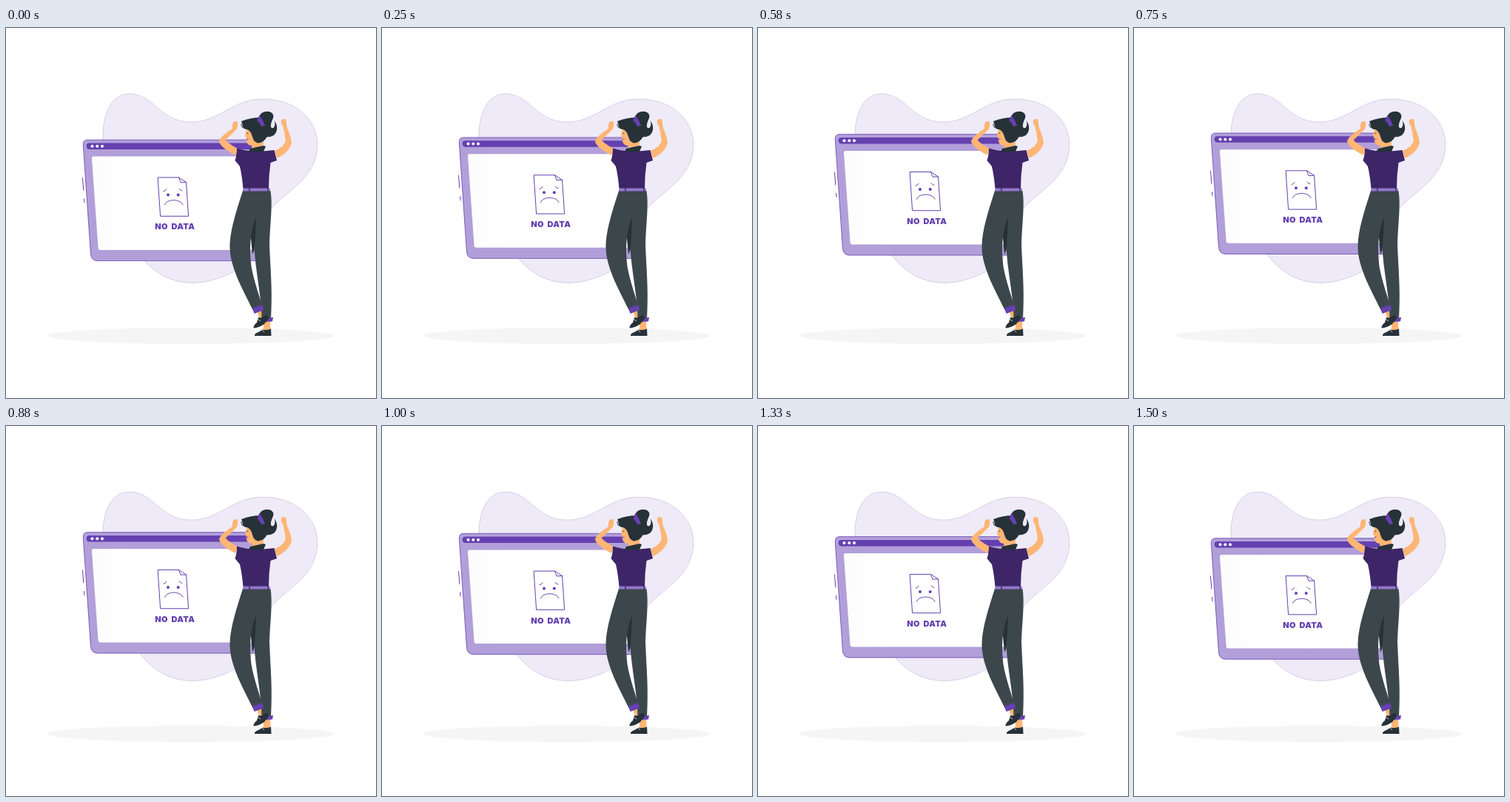
These frames come from a looping animation (500x500 px, 1.54 s). An HTML page:

```html
<!DOCTYPE html>
<html lang="en">
<head>
<meta charset="utf-8">
<title>No data</title>
<style>
  html, body { margin: 0; width: 100%; height: 100%; overflow: hidden; background: #fff; }
  svg { display: block; width: 100%; height: 100%; }
  .main { fill: #6540b0; }
  .dark { fill: #263238; }
  .skin { fill: #ffb573; }
  .pants { fill: #3c474c; }
  .line { fill: none; stroke: #6540b0; stroke-linecap: round; stroke-linejoin: round; }
  text { font: 900 11px Inter, sans-serif; letter-spacing: .35px; word-spacing: 2px; }
</style>
</head>
<body>
<svg viewBox="0 0 500 500">
  <defs>
    <linearGradient id="screen">
      <stop offset="0" stop-color="#fcfcfc"/>
      <stop offset=".3" stop-color="#fff"/>
    </linearGradient>
  </defs>

  <path fill="#eeeaf7" stroke="#a99bc9" stroke-width=".4" d="M131 150C130 115 143 89 166 89C200 88 207 127 250 127C290 127 305 95 350 96C395 97 421 127 421 158C420 200 385 217 362 240C345 258 345 304 320 322C302 334 276 344.5 252 344.5C220 344 197 329 180 306C160 280 131 200 131 150Z"/>
  <ellipse cx="249.5" cy="416" rx="193.5" ry="11" fill="#f5f5f5"/>

  <g id="window">
    <path fill="#b29fd9" stroke="#6540b0" stroke-width=".8" d="M110 151.2H331Q336 151.2 336.4 157L346 314.6H124Q115.5 314.6 114.5 306L104.300 158Q104 151.2 110 151.2Z"/>
    <path class="main" d="M112.5 155.5H332V164H113Q109 164 108.700 159.7Q108.5 155.5 112.5 155.5Z"/>
    <g fill="#fff">
      <circle cx="116.5" cy="159.7" r="2"/>
      <circle cx="123.3" cy="159.7" r="2"/>
      <circle cx="130" cy="159.7" r="2"/>
    </g>
    <path fill="url(#screen)" d="M118.5 173.5H327L334 300H127.5Q124.9 300 124.6 297.5L116 176.5Q115.8 173.5 118.5 173.5Z"/>
    <path class="line" d="M205.5 202H233.5L243.5 208.5L246.6 254.3H209ZM233.5 202L236 208.8L243.5 208.5"/>
    <path class="line" d="M213 220.8Q216 220 217 217.8M234 217.3Q235.5 219.5 238 220M214.5 238.8C217 230.5 236 230.5 239 238.8"/>
    <circle class="main" cx="219" cy="225.5" r="2"/>
    <circle class="main" cx="232.7" cy="225.5" r="2"/>
    <path class="line" d="M103.5 202.5L104.8 219.5M105.6 231L106 236"/>
    <text class="main" x="201.3" y="272.5">NO DATA</text>
  </g>

  <g id="woman">
    <path class="skin" d="M339 383L346 380L349 391L343 394ZM348 396H357L357.5 409H348Z"/>
    <path class="skin" d="M307.5 127Q310 125 313 127.5Q314 132 311.5 137L297 151Q297 154 313 163L310 172Q289 161 288 153Q289 147 306 136Q305.5 130 307.5 127ZM372 124Q377 121.5 378.5 125L379.5 134Q386 149 386 155Q383 168 366 176L363 166Q376 161 378 152L374.5 133Q371.5 130 372 124Z"/>
    <path class="pants" d="M329 220H357.5C360.5 238 357 265 356 290C357 325 360.5 350 358 394L345.5 393C346 365 336 325 335 287Z"/>
    <path class="dark" d="M329 262L338 256Q337 285 335.5 300L333 306Z"/>
    <path class="pants" d="M320 220H349L338 255C329 278 329 300 331.5 322C335 342 342 360 346.5 377L334 382C322 357 303 325 302.5 297C302 275 312 245 320 220Z"/>
    <path class="main" d="M333 378.5L346 374L348.5 381L335.5 386ZM346 393L361 391L360 396.5L346 397.5Z"/>
    <path class="dark" d="M341 391Q346 393 352 387L355.5 392L349 400Q342 405 334.5 405.5Q334 402 339 398ZM347 407.5Q352 409 358 406.5L358.5 416H336Q335.5 412.5 341 411Z"/>
    <path d="M339 393L344 396M345 407L349 411" stroke="#fff" stroke-width=".7"/>
    <path fill="#3d2567" d="M312 162.5Q330 168 347 166.5L362.5 165L366 179L357.5 182Q355 199 355 217H320.5Q319 200 316 187L309.5 179Q312 172 312 162.5Z"/>
    <path fill="#9177c9" d="M320.5 216.5H356.5L357 220.5H320Z"/>
    <path d="M329 216V221M354 216V221" stroke="#3d2567" stroke-width="1.3"/>

    <path class="skin" d="M325 136L323 146L324.5 148Q324.5 160 333 159L332 165H347L349 145L339 135Z"/>
    <path class="dark" d="M330 163Q338 161 348 159L351 160L348 167H328ZM318 126Q331 121 343 121Q355 127 355 140Q352 154 341 155.5Q335 155 333 147Q331 139 326 137Q321 137 319.5 133Q320 130 318 126Z"/>
    <path class="dark" d="M342 121C343 111.5 358 110 361 117C363 122 357 126 358 134C362 138 365 131 362.5 125C370 134 366 149 352 147L347 132Z"/>
    <path class="main" d="M343 118Q339 121 340 126Q343 128 345 133L350 132Q347 124 343 118Z"/>
    <path d="M325 142.5L327.5 142M318 129Q317 132 320 135" fill="none" stroke="#263238" stroke-width=".8"/>
    <path d="M325 150.5L327.5 150" stroke="#6540b0"/>
  </g>
</svg>
<script>
  const FRAMES = 37, STEP = 1000 / 24, LOOP = 1540, RISE = 10;
  const panel = document.getElementById('window');
  const start = performance.now();

  function draw(now) {
    const time = Math.max(0, now - start) % LOOP;
    const frame = Math.floor((time + 4) / STEP);
    const phase = ((frame + 1) % FRAMES) / FRAMES;
    const lift = RISE * (1 - Math.abs(1 - 2 * phase));
    panel.setAttribute('transform', `translate(0 ${0.54 - lift})`);
    requestAnimationFrame(draw);
  }
  draw(start);
</script>
</body>
</html>
```
